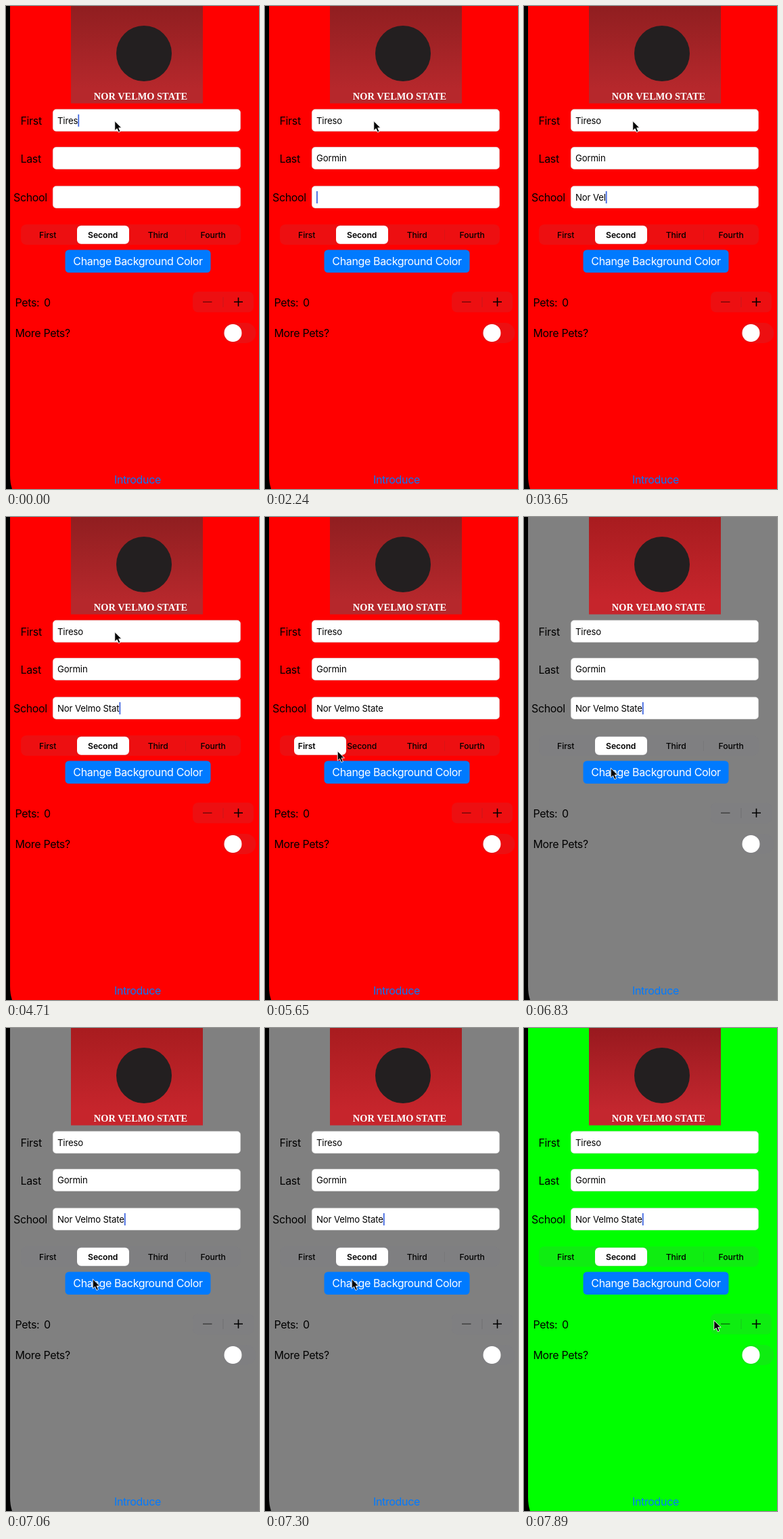
Recreate the animation shown at these times as an HTML page. Size 374 by 712 pixels, loop 8000 ms.

```html
<!DOCTYPE html>
<html lang="en">
<head>
<meta charset="utf-8">
<title>Introduction form</title>
<style>
  html, body { margin: 0; height: 100%; overflow: hidden; background: #000; }
  svg { display: block; width: 100vw; height: 100vh; }
  text { font: 16px Inter, sans-serif; letter-spacing: -.35px; white-space: pre; }
  .mid { text-anchor: middle; }
  .typed { font-size: 13.2px; letter-spacing: -.15px; }
  .seg { font-size: 12.2px; font-weight: 500; letter-spacing: -.08px; }
  .seg.on { font-weight: 600; }
  .mark { font: bold 14.4px "Liberation Serif", serif; letter-spacing: 0; fill: #fff; }
  .field { fill: #fff; stroke: #ccc; stroke-width: .5; }
  .tint { fill: #767680; fill-opacity: .13; }
  .rule { stroke: #3c3c43; stroke-opacity: .22; }
  .rule.faint { stroke-opacity: .1; }
</style>
</head>
<body>
<svg viewBox="0 0 374 712">
  <defs>
    <linearGradient id="panel" x2="0" y2="1">
      <stop id="panelTop"/>
      <stop id="panelEnd" offset=".85"/>
    </linearGradient>
  </defs>
  <rect width="374" height="712"/>
  <path id="screen" d="M6 0V692Q6 703 9 712H374V0Z"/>

  <rect x="96" width="195" height="143.5" fill="url(#panel)"/>
  <circle cx="204" cy="70" r="41" fill="#231f20"/>
  <text class="mark mid" x="199" y="137.5">NOR VELMO STATE</text>

  <text x="21.5" y="175">First</text>
  <text x="21.5" y="230.5">Last</text>
  <text x="11" y="288">School</text>
  <g id="fields"></g>
  <rect id="caret" width="1.8" height="18" fill="#3f66e0"/>

  <rect class="tint" x="22" y="322" width="325" height="30" rx="8"/>
  <path class="rule faint" d="M265.5 330V345"/>
  <rect id="thumb" y="323.8" width="77" height="27" rx="6" fill="#fff"/>
  <g id="segments"></g>

  <rect x="87.5" y="359.5" width="215" height="33.5" rx="5.5" fill="#007aff"/>
  <text class="mid" x="195" y="382.3" fill="#fff">Change Background Color</text>

  <text x="13.5" y="442.5">Pets:</text>
  <text x="56" y="442.5">0</text>
  <rect class="tint" x="276" y="421" width="90" height="30.5" rx="8"/>
  <path class="rule" d="M321 429V444"/>
  <path d="M291 436.3H304.5" stroke="#000" stroke-width="1.5" opacity=".5"/>
  <path d="M337 436.3H350M343.5 429.8V442.8" stroke="#000" stroke-width="1.6"/>

  <text x="13.5" y="487.8">More Pets?</text>
  <rect class="tint" x="320.5" y="467" width="49" height="30" rx="15"/>
  <circle cx="335.5" cy="482" r="13" fill="#fff"/>

  <text class="mid" x="194.5" y="703.5" fill="#007aff">Introduce</text>
  <path id="pointer" d="M0 0V14.2L3.3 11.2L5.6 16.6L8.2 15.5L5.9 10.2H10.2Z"
        stroke="#fff" stroke-width=".9"/>
</svg>
<script>
const LOOP = 8000, TICKS = 68, STEP = LOOP / TICKS;
const $ = id => document.getElementById(id);

function add(parent, tag, attrs, text = '') {
  const el = document.createElementNS('http://www.w3.org/2000/svg', tag);
  for (const name in attrs) el.setAttribute(name, attrs[name]);
  el.textContent = text;
  return parent.appendChild(el);
}

// All times below are in ticks; keys holds the moment each letter appears.
const fields = [
  { y: 152.2, focus: 0, text: 'Tireso', keys: [0, 0, 0, 0, 0, 1] },
  { y: 208, focus: 3, text: 'Gormin', keys: [9, 10, 11, 13, 15, 16] },
  { y: 265.4, focus: 19, text: 'Nor Velmo State',
    keys: [25, 26, 27, 28, 29, 30, 31, 32, 33, 34, 35, 36, 38, 40, 41] }
];
for (const f of fields) {
  add($('fields'), 'rect', { class: 'field', x: 69.3, y: f.y, width: 277.3, height: 32.5, rx: 5 });
  f.label = add($('fields'), 'text', { class: 'typed', x: 76, y: f.y + 21.4 });
}
const segments = ['First', 'Second', 'Third', 'Fourth'].map((name, i) =>
  add($('segments'), 'text', { class: 'seg mid', x: 61.7 + 81.5 * i, y: 342 }, name));

const pointerPath = [
  [0, 160.8, 169.5], [42, 160.8, 169.5], [44, 100, 280], [46, 55, 347],
  [48, 107.2, 345], [50, 132, 346], [53, 128.3, 370], [63, 128.3, 370], [67, 280.8, 431]
];
const thumbPath = [
  [0, 105], [46, 105], [47, 80], [48, 43], [49, 28],
  [50, 23.5], [51, 40], [52, 90], [53, 105]
];
const themes = [
  [0, '#f00', '#901e20', '#b6282c'],
  [54, '#00f', '#a81c1f', '#c6252c'],
  [58, '#808080', '#a81c1f', '#c6252c'],
  [63, '#0f0', '#98191e', '#c4272f']
];

const latest = (list, tick, at) => list.filter(item => at(item) <= tick).pop();
const clamp = v => Math.max(0, Math.min(1, v));

function along(path, tick) {
  const next = path.findIndex(p => p[0] > tick);
  if (next < 0) return path[path.length - 1].slice(1);
  const a = path[next - 1], b = path[next];
  const u = (tick - a[0]) / (b[0] - a[0]);
  return a.slice(1).map((v, i) => v + (b[i + 1] - v) * u);
}

// The caret stays solid after input, then fades out and in once a second.
function caretOpacity(ms) {
  const phase = ms % 1000;
  return phase < 850 ? clamp(1 - (phase - 490) / 210) : clamp((phase - 850) / 100);
}

function draw(tick) {
  for (const f of fields) {
    const count = f.keys.filter(k => k <= tick).length;
    f.label.textContent = f.text.slice(0, count);
  }
  const active = latest(fields, tick, f => f.focus);
  const lastInput = latest([active.focus, ...active.keys], tick, k => k);
  const caret = $('caret');
  caret.setAttribute('x', 76 + active.label.getComputedTextLength());
  caret.setAttribute('y', active.y + 7.6);
  caret.setAttribute('opacity', caretOpacity((tick - lastInput) * STEP));

  const [, color, top, end] = latest(themes, tick, t => t[0]);
  $('screen').setAttribute('fill', color);
  $('panelTop').setAttribute('stop-color', top);
  $('panelEnd').setAttribute('stop-color', end);

  $('thumb').setAttribute('x', along(thumbPath, tick)[0]);
  const selected = tick >= 47 && tick <= 50 ? 0 : 1;
  segments.forEach((s, i) => s.classList.toggle('on', i === selected));
  $('pointer').setAttribute('transform', `translate(${along(pointerPath, tick)})`);
}

const start = performance.now();
function frame() {
  const time = (performance.now() - start) % LOOP;
  draw(Math.floor(time / STEP));
  requestAnimationFrame(frame);
}
frame();
</script>
</body>
</html>
```
